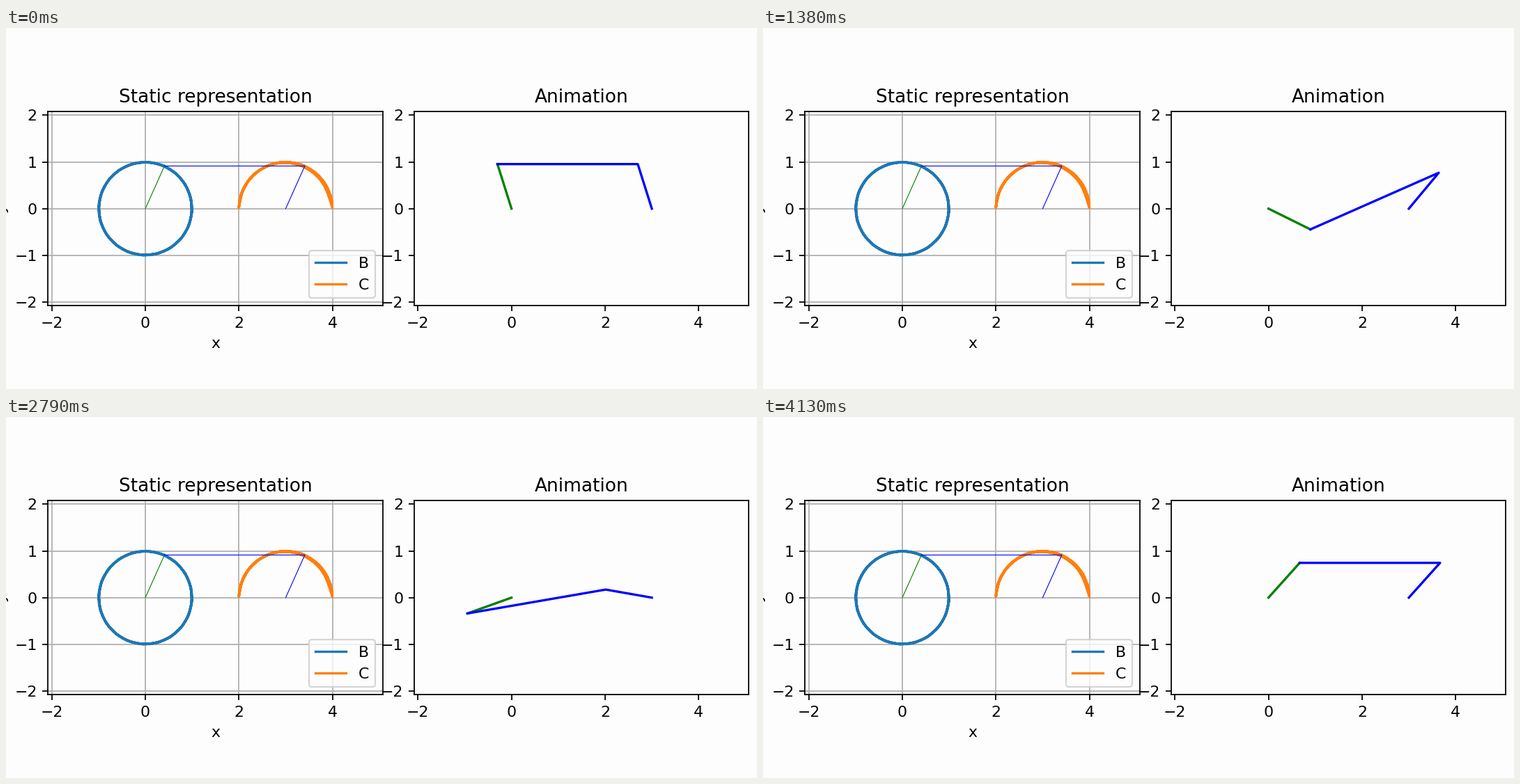
Write a matplotlib script that moves like this. It is 1078 px wide and 519 px high and loops after 4.18 s.

```python
import numpy as np
import matplotlib.pyplot as plt
from matplotlib.animation import FuncAnimation

W, H, DPI = 1078, 519, 160
UNIT = 67.15            # pixels per data unit
FRAMES, LOOP_MS = 100, 4180
START, STEP = 1.876, 0.31   # crank angle and its step, radians
BAR = 3.0               # length of the coupler and of the base
TOP, BOTTOM, MID_Y = 120.0, 399.4, 259.7

plt.rcParams.update({
    "font.family": "DejaVu Sans",
    "font.size": 9.9,
    "axes.titlesize": 11.88,
    "axes.facecolor": "#fdfdfd",
    "figure.facecolor": "#fdfdfd",
})


def linkage(angle):
    """Crank end B and rocker end C, with C on the upper branch."""
    b = np.array([np.cos(angle), np.sin(angle)])
    bar = np.array([BAR, 0.0])
    if b[1] >= 0:
        return b, b + bar
    axis = (bar - b) / np.linalg.norm(bar - b)
    return b, b + 2 * bar.dot(axis) * axis - bar


def add_axes(fig, left, right, origin_x, title):
    ax = fig.add_axes([left / W, 1 - BOTTOM / H,
                       (right - left) / W, (BOTTOM - TOP) / H])
    ax.set_xlim((left - origin_x) / UNIT, (right - origin_x) / UNIT)
    ax.set_ylim((MID_Y - BOTTOM) / UNIT, (MID_Y - TOP) / UNIT)
    ax.set_xticks([-2, 0, 2, 4])
    ax.set_yticks([-2, -1, 0, 1, 2])
    ax.set_title(title)
    return ax


def add_arms(ax, width):
    crank, = ax.plot([], [], color="green", lw=width)
    rods, = ax.plot([], [], color="blue", lw=width)
    return crank, rods


def pose(arms, b, c):
    crank, rods = arms
    crank.set_data([0, b[0]], [0, b[1]])
    rods.set_data([b[0], c[0], BAR], [b[1], c[1], 0])


joints = [linkage(START + STEP * i) for i in range(FRAMES)]
path_b, path_c = np.array(joints).transpose(1, 2, 0)

fig = plt.figure(figsize=(W / DPI, H / DPI), dpi=DPI)

static = add_axes(fig, 60.2, 540.6, 200.0, "Static representation")
static.plot(*path_b, color="tab:blue", label="B")
static.plot(*path_c, color="tab:orange", label="C")
pose(add_arms(static, 0.5), *joints[-1])
static.set_xlabel("x")
static.set_ylabel("y")
static.grid(True)
static.legend(loc="lower right")

moving = add_axes(fig, 585.8, 1066.2, 725.6, "Animation")
arms = add_arms(moving, 1.5)


def update(i):
    pose(arms, *joints[i])
    return arms


anim = FuncAnimation(fig, update, frames=FRAMES, interval=LOOP_MS / FRAMES,
                     repeat=True, repeat_delay=0, blit=False)
plt.show()
```
